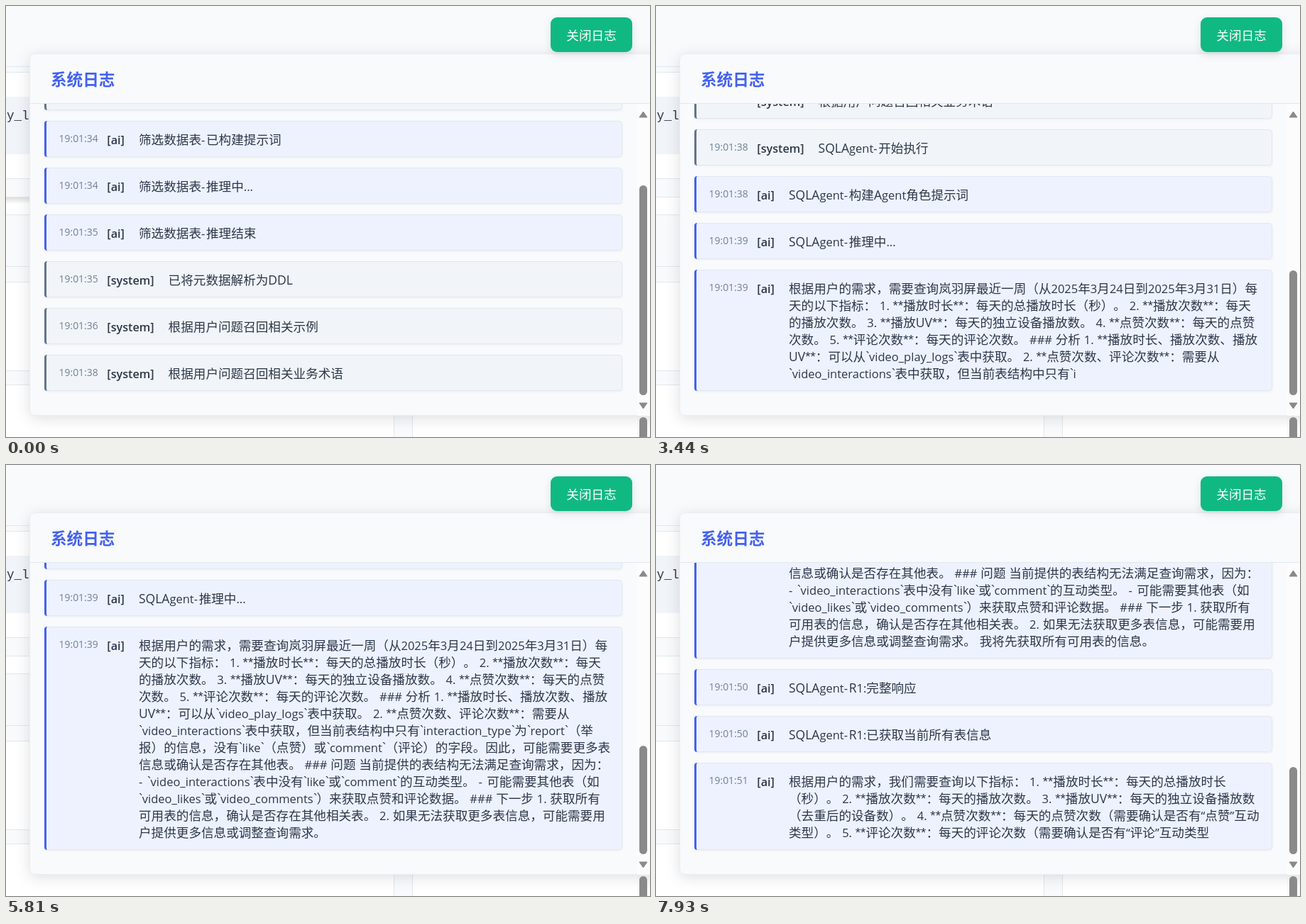
An HTML page that plays this animation: 907x608 px, repeating every 8000 ms.

```html
<!DOCTYPE html>
<html lang="zh-CN">
<head>
<meta charset="utf-8">
<title>系统日志</title>
<style>
html, body { margin: 0; width: 100%; height: 100%; overflow: hidden; background: #f8fafc; }
svg { display: block; width: 907px; height: 608px; }
text { font: 16.5px "Open Sans", "Noto Sans CJK SC", "Noto Sans CJK", sans-serif; fill: #2d3748; white-space: pre; word-spacing: .5px; text-spacing-trim: space-all; }
.cjk { font-family: "Noto Sans CJK SC", "Noto Sans CJK", sans-serif; font-size: 17.6px; }
.cap { font-size: 17.5px; }
.dash { letter-spacing: 1.7px; }
.star { font-family: "Liberation Sans", sans-serif; font-size: 18.8px; }
.tick { font-family: "Liberation Sans", sans-serif; font-size: 17.6px; letter-spacing: -1.1px; }
.time { font-size: 13.9px; fill: #718096; }
.role { font-size: 16.2px; font-weight: 600; }
.title { font-size: 22.6px; font-weight: 700; fill: #4361ee; }
.code { font: 17.6px "Liberation Mono", monospace; }
.btn { fill: #fff; }
.edge { stroke: #e2e8f0; }
.row { filter: drop-shadow(0 1px 1.5px rgba(0,0,0,.05)); }
#panel { filter: drop-shadow(0 4px 10px rgba(0,0,0,.12)); }
#button { filter: drop-shadow(0 4px 6px rgba(0,0,0,.1)); }
</style>
</head>
<body>
<svg viewBox="0 0 907 608">
  <defs>
    <clipPath id="view"><rect x="34" y="138" width="855" height="440"/></clipPath>
    <linearGradient id="fade" x2="0" y2="1">
      <stop offset="0" stop-color="#000" stop-opacity=".13"/>
      <stop offset="1" stop-color="#000" stop-opacity="0"/>
    </linearGradient>
  </defs>
  <rect width="907" height="608" fill="#f8fafc"/>
  <g id="page"></g>
  <rect id="lift" y="270" width="40" height="9" fill="url(#fade)"/>
  <text class="code" x="1" y="160">y_l</text>
  <path d="M546.5 570V608M572.5 570V608" class="edge"/>
  <rect x="889" y="570" width="18" height="38" fill="#fcfcfc"/>
  <path id="panel" d="M920 67H41a8 8 0 0 0-8 8V570a8 8 0 0 0 8 8H920z" fill="#f8fafc"/>
  <path d="M920 67.5H41a7.5 7.5 0 0 0-7.5 7.5V570a7.5 7.5 0 0 0 7.5 7.5H920" fill="none" stroke="#e9edf3"/>
  <path d="M34 137.5H907" class="edge"/>
  <text class="title" x="63" y="111.5">系统日志</text>
  <g id="log" clip-path="url(#view)"></g>
  <rect x="889" y="138" width="18" height="440" fill="#fcfcfc"/>
  <g fill="#8a8a8a">
    <path d="M892 157L897.500 149L903 157z" stroke="#8a8a8a" stroke-linejoin="round"/>
    <path d="M892 560L897.500 568L903 560z" stroke="#8a8a8a" stroke-linejoin="round"/>
    <rect id="thumb" x="892" width="11" rx="5.5"/>
    <rect x="892" y="580" width="11" height="60" rx="5.5"/>
  </g>
  <rect id="button" x="767" y="16" width="115" height="49" rx="9" fill="#10b981"/>
  <text class="btn cjk" x="789.3" y="48">关闭日志</text>
  <path id="mouse" d="M.5 .5V15.5L4 12.3L6.3 17.5L8.8 16.4L6.5 11.3H11z" fill="#fff" stroke="#111"/>
</svg>
<script>
const $ = id => document.getElementById(id);
const LOOP = 8000, STEP = 132.2;

// Page cards behind the panel: top, bottom, fill
const cards = [[85, 94, '#f8fafc'], [93, 244, '#fff'], [243, 270, '#f8fafc'], [269, 295, '#fff'],
  [294, 368, '#f8fafc'], [367, 390, '#f8fafc'], [389, 515, '#fff'], [514, 535, '#f8fafc']];
$('page').innerHTML = cards.map(([a, b, fill]) =>
  `<rect x="-2" y="${a + .5}" width="60" height="${b - a - 1}" fill="${fill}" class="edge"/>`).join('') +
  '<rect y="128" width="60" height="81" fill="#f1f5f9"/>' +
  '<rect x="-2" y="534.5" width="548.5" height="90" fill="#fff" class="edge"/>' +
  '<rect x="572.5" y="534.5" width="350" height="90" fill="#fff" class="edge"/>';

const plan = [
  '根据用户的需求，需要查询岚羽屏最近一周（从2025年3月24日到2025年3月31日）每',
  '天的以下指标： 1. **播放时长**：每天的总播放时长（秒）。 2. **播放次数**：每天',
  '的播放次数。 3. **播放UV**：每天的独立设备播放数。 4. **点赞次数**：每天的点赞',
  '次数。 5. **评论次数**：每天的评论次数。 ### 分析 1. **播放时长、播放次数、播放',
  'UV**：可以从`video_play_logs`表中获取。 2. **点赞次数、评论次数**：需要从',
  '`video_interactions`表中获取，但当前表结构中只有`interaction_type`为`report`（举',
  '报）的信息，没有`like`（点赞）或`comment`（评论）的字段。因此，可能需要更多表',
  '信息或确认是否存在其他表。 ### 问题 当前提供的表结构无法满足查询需求，因为：',
  '- `video_interactions`表中没有`like`或`comment`的互动类型。 - 可能需要其他表（如',
  '`video_likes`或`video_comments`）来获取点赞和评论数据。 ### 下一步 1. 获取所有',
  '可用表的信息，确认是否存在其他相关表。 2. 如果无法获取更多表信息，可能需要用',
  '户提供更多信息或调整查询需求。 我将先获取所有可用表的信息。'
];
const metrics = [
  '根据用户的需求，我们需要查询以下指标： 1. **播放时长**：每天的总播放时长',
  '（秒）。 2. **播放次数**：每天的播放次数。 3. **播放UV**：每天的独立设备播放数',
  '（去重后的设备数）。 4. **点赞次数**：每天的点赞次数（需要确认是否有“点赞”互动',
  '类型）。 5. **评论次数**：每天的评论次数（需要确认是否有“评论”互动类型'
];

// Typing pace: step and the words reached by then
const pace = (lines, marks) => marks.map(([step, mark]) => [step, lines.join('').indexOf(mark) + mark.length]);
const planPace = pace(plan, [[7, '根据'], [13, '（秒）。 2'], [20, '1. **播放时长、播放'], [33, '无法满足查询'],
  [35, '`like`或`'], [36, '互动类型。 -'], [40, '下一步 1.'], [43, '可能需要用户'], [45, '我将先获取所有可用表的信息。']]);
const metricsPace = pace(metrics, [[49, '根据'], [52, '（秒）。 2'], [54, '播放UV**：'], [55, '播放数（去'],
  [60, '有“评论”互动类型']]);

// step of arrival, time, role, lines, typing pace
const rows = [
  [0, '19:01:34', 'system', ['']],
  [0, '19:01:34', 'ai', ['筛选数据表-已构建提示词']],
  [0, '19:01:34', 'ai', ['筛选数据表-推理中...']],
  [0, '19:01:35', 'ai', ['筛选数据表-推理结束']],
  [0, '19:01:35', 'system', ['已将元数据解析为DDL']],
  [0, '19:01:36', 'system', ['根据用户问题召回相关示例']],
  [0, '19:01:38', 'system', ['根据用户问题召回相关业务术语']],
  [2, '19:01:38', 'system', ['SQLAgent-开始执行']],
  [3, '19:01:38', 'ai', ['SQLAgent-构建Agent角色提示词']],
  [5, '19:01:39', 'ai', ['SQLAgent-推理中...']],
  [7, '19:01:39', 'ai', plan, planPace],
  [48, '19:01:50', 'ai', ['SQLAgent-R1:完整响应']],
  [48, '19:01:50', 'ai', ['SQLAgent-R1:已获取当前所有表信息']],
  [49, '19:01:51', 'ai', metrics, metricsPace]
];

const mousePath = [[2, 0, 590], [3, 11, 542], [4, 31, 531], [5, 45, 518], [7, 66, 506], [13, 66, 506],
  [14, 56, 522], [15, 42, 545], [16, 24, 565]];

// Linear value of one column of a keyed list
function at(keys, step, col = 1) {
  const i = keys.findIndex(k => k[0] >= step);
  if (i < 0) return keys[keys.length - 1][col];
  if (i === 0) return keys[0][col];
  const a = keys[i - 1], b = keys[i];
  return a[col] + (b[col] - a[col]) * (step - a[0]) / (b[0] - a[0]);
}

function typed(lines, count) {
  const out = [];
  for (const line of lines) {
    if (count <= 0) break;
    out.push(line.slice(0, count));
    count -= line.length;
  }
  return out;
}

const kinds = [[/^[\u2e80-\uffef]/, 'cjk'], [/^[A-Z]/, 'cap'], [/^\*/, 'star'], [/^`/, 'tick'], [/^-/, 'dash']];
function runs(line) {
  const parts = line.match(/[\u2e80-\uffef]+|[A-Z]+|\*+|`+|-+|[^\u2e80-\uffefA-Z*`-]+/g) || [];
  return parts.map(p => {
    const kind = kinds.find(k => k[0].test(p));
    return kind ? `<tspan class="${kind[1]}">${p}</tspan>` : p;
  }).join('');
}

function drawRow(time, role, lines, y, h, shift) {
  const ai = role === 'ai', x = ai ? 187 : 228.6;
  return `<g transform="translate(${shift} ${y})">
    <rect class="row edge" x="54.5" y=".5" width="813" height="${h - 1}" rx="4" fill="${ai ? '#eef2ff' : '#f1f5f9'}"/>
    <path d="M58 0a4 4 0 0 0-4 4v${h - 8}a4 4 0 0 0 4 4q-1-.5-1-4V4q0-3.5 1-4z" fill="${ai ? '#4361ee' : '#64748b'}"/>
    <text class="time" x="74.6" y="30">${time}</text>
    <text class="role" x="142.3" y="32.5">[${role}]</text>` +
    lines.map((s, i) => `<text x="${x}" y="${32.5 + 24 * i}">${runs(s)}</text>`).join('') + '</g>';
}

function draw(step) {
  let bottom = 543, total = 102, html = '';
  const hover = step >= 7 && step <= 14;
  rows.filter(r => r[0] <= step).reverse().forEach(([, time, role, all, keys], i) => {
    const lines = keys ? typed(all, Math.round(at(keys, step))) : all;
    const h = 27 + 24 * lines.length, y = bottom - h;
    if (bottom > 130) html += drawRow(time, role, lines, y, h, hover && i === 0 ? 2.5 : 0);
    bottom = y - 15;
    total += h + 15;
  });
  $('log').innerHTML = html;
  const size = Math.round(166950 / total);
  $('thumb').setAttribute('y', 549 - size);
  $('thumb').setAttribute('height', size);
  $('lift').setAttribute('opacity', step < 3 ? 1 : step < 5 ? .5 : 0);
  $('mouse').setAttribute('visibility', step >= 2 && step <= 16 ? 'visible' : 'hidden');
  $('mouse').setAttribute('transform', `translate(${Math.round(at(mousePath, step))} ${Math.round(at(mousePath, step, 2))})`);
}

let shown = -1;
function frame() {
  const step = Math.floor((performance.now() % LOOP + 8) / STEP);
  if (step !== shown) draw(shown = step);
  requestAnimationFrame(frame);
}
frame();
</script>
</body>
</html>
```
